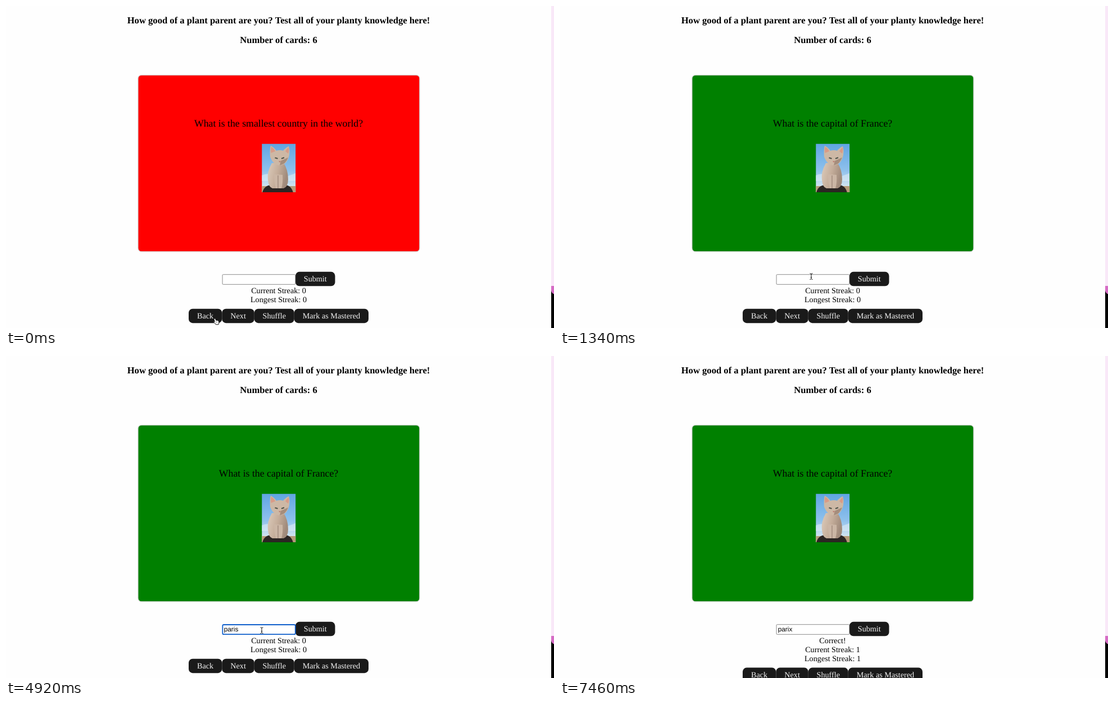
These frames come from a looping animation (975x574 px, 8 s). An HTML page:

```html
<!DOCTYPE html>
<html lang="en">
<head>
<meta charset="utf-8">
<title>Plant quiz cards</title>
<style>
  html, body { margin: 0; width: 100%; height: 100%; overflow: hidden; background: #fefefe; }
  svg { display: block; width: 975px; height: 574px; }
  text { font: 14.2px "Liberation Serif", "Times New Roman", serif; text-anchor: middle; text-rendering: geometricPrecision; white-space: pre; }
  .head { font-size: 16.61px; font-weight: bold; }
  .ask { font-size: 17.75px; }
  .typed { font: 11.83px "Liberation Sans", Arial, sans-serif; text-anchor: start; }
  .btn rect { fill: #1a1a1a; }
  .btn text { fill: #f4f4f4; }
</style>
</head>
<body>
<svg viewBox="0 0 975 574">
  <defs>
    <linearGradient id="sky" x2="0" y2="1">
      <stop offset="0" stop-color="#5fa5e2"/>
      <stop offset=".55" stop-color="#8fc1ec"/>
      <stop offset=".88" stop-color="#d3e5f1"/>
    </linearGradient>
    <linearGradient id="fur" x2="1" y2=".3">
      <stop offset="0" stop-color="#dccbbb"/>
      <stop offset=".55" stop-color="#c4ad9a"/>
      <stop offset="1" stop-color="#a08a7b"/>
    </linearGradient>
    <clipPath id="frame"><rect x="455.3" y="245.7" width="59.9" height="86.3"/></clipPath>
  </defs>

  <!-- window edge -->
  <rect x="970" width="5" height="499" fill="#f9e8f8"/>
  <rect x="970" y="499" width="5" height="75"/>
  <path d="M970 499h5v14.5q-4.300-1.500-5-6.500z" fill="#d66cc5"/>

  <text class="head" x="485" y="31">How good of a plant parent are you? Test all of your planty knowledge here!</text>
  <text class="head" x="485" y="66">Number of cards: 6</text>

  <rect id="card" x="235" y="123.200" width="500.800" height="314.600" rx="6" stroke="#ccc" stroke-width="1.100"/>
  <text id="ask" class="ask" x="485" y="215.300"></text>

  <!-- kitten picture -->
  <g clip-path="url(#frame)">
    <rect x="455" y="245" width="61" height="88" fill="url(#sky)"/>
    <path d="M455 302q12-6 20 2t40-6v14h-60z" fill="#dcebf5" opacity=".6"/>
    <path d="M455 321h61v12h-61z" fill="#b59a78"/>
    <path d="M456 333q3-14 18-14h24q10 2 13 14z" fill="#2b2523"/>
    <path d="M473 280q-9 16-7 30 1 13 8 15h20q8-3 8-16 0-17-8-29z" fill="url(#fur)"/>
    <path d="M477 300q0 15 3 25h10q3-10 2-24z" fill="#cbb6a5"/>
    <path d="M484 302v23" stroke="#8d776a"/>
    <path d="M470 269q-1-14 1-20 6 3 10 9 6-2 12 0 5-6 10-8 3 9 0 20-5 14-16 14t-17-15z" fill="#cdb8a5"/>
    <path d="M471.500 262q-1-7 .500-11 5 3 7 8zM497 259q3-5 6-7 1 6-1 11z" fill="#d99b87"/>
    <path d="M489 276l13-6q-4 12-15 14z" fill="#a58d7c"/>
    <path d="M478.500 270.500l5 1.500M490 272l5-1.700" stroke="#4c5147" stroke-width="2"/>
    <path d="M485 276.500h4l-2 2.500z" fill="#b8776b"/>
  </g>

  <g id="submit" class="btn"></g>
  <rect id="box" fill="#fff"/>
  <text id="typed" class="typed" x="387.700" y="491"></text>
  <path id="caret" stroke="#000" stroke-width=".900"/>

  <text id="note" x="485" y="512">Correct!</text>
  <g id="lower">
    <text id="now" x="485" y="512"></text>
    <text id="best" x="485" y="528"></text>
    <g id="row" class="btn"></g>
  </g>

  <g id="hand">
    <path d="M-2.700-5.300q1.200-.700 1.900.600l1.100 2.700 1.400-.300 1.200.500 1.200.100.900 1.400.400 3-.900 2.600H-.200l-1.300-2-2.400-2.400q-.300-1.400 1.200-1l.700.500-1.500-4.200q-.300-1 .800-1.500z"
          fill="#fff" stroke="#111" stroke-width="1" stroke-linejoin="round"/>
    <path d="M.300-.200v2M2-.100v2" stroke="#333" stroke-width=".600"/>
  </g>
  <path id="arrow" d="M0 0v11.500l2.700-2.500 1.900 4.200 1.900-.800-1.900-4.100h3.700z" stroke="#fff" stroke-width=".800"/>
  <path id="beam" d="M-2.500-5.200q2 0 2.500 1.200 .500-1.200 2.500-1.200M-2.500 5.500q2 0 2.500-1.200 .500 1.200 2.500 1.200M0-4v8.500M-1.200 1.800h2.400" fill="none" stroke="#111" stroke-width="1"/>
</svg>

<script>
const $ = id => document.getElementById(id);
const LOOP = 8000;

// Each track holds [start time, values...] and keeps its value until the next entry.
const cards = [
  [0, "#f00", "What is the smallest country in the world?"],
  [140, "#ffa500", "What is the largest mammal in the world?"],
  [290, "#008000", "What is the capital of France?"]
];
const typing = [
  [0, "", 0], [1640, "", 1], [2090, "o", 1], [2380, "oa", 1],
  [2680, "o", 1], [2830, "", 1], [2980, "p", 1], [3130, "pa", 1], [3270, "par", 1],
  [3870, "par", 0], [4020, "pari", 1], [4170, "paris", 1], [4620, "paris", 0],
  [5210, "paris", 1], [5660, "paris", 0], [5810, "pari", 1], [5960, "parix", 1],
  [6410, "parix", 0]
];
const pointer = [
  [0, "hand", 373.5, 562.5], [890, "hand", 392, 549], [1040, "arrow", 422, 512],
  [1190, "arrow", 440, 464], [1340, "beam", 447, 482], [1490, "beam", 449, 488],
  [1790, "beam", 449, 489], [4920, "beam", 455, 489], [5060, "beam", 461, 488],
  [5210, "beam", 464.3, 488], [6560, "beam", 496, 487], [6710, "hand", 554, 489.5],
  [7460, "none", 0, 0]
];
const FOCUS = [1640, 6860], CORRECT = 7010;

const at = (track, t) => track.findLast(step => step[0] <= t);
const set = (id, attrs) => {
  for (const key in attrs) $(id).setAttribute(key, attrs[key]);
};
const show = (id, on) => set(id, { visibility: on ? "visible" : "hidden" });

function button(parent, label, x, y, w) {
  $(parent).innerHTML +=
    `<rect x="${x}" y="${y}" width="${w}" height="25.5" rx="7.1"/>` +
    `<text x="${x + w / 2}" y="${y + 17.2}">${label}</text>`;
}

button("submit", "Submit", 515, 473.8, 70.5);
let left = 325;
for (const [label, w] of [["Back", 59.3], ["Next", 57.5], ["Shuffle", 71], ["Mark as Mastered", 132.2]]) {
  button("row", label, left, 539.7, w);
  left += w;
}

function draw(t) {
  const [, color, question] = at(cards, t);
  set("card", { fill: color });
  $("ask").textContent = question;

  const focused = t >= FOCUS[0] && t < FOCUS[1];
  set("box", focused
    ? { x: 385.4, y: 479, width: 129.4, height: 17.2, rx: 2, stroke: "#0f5fcb", "stroke-width": 1.8 }
    : { x: 385.1, y: 478.7, width: 129.7, height: 17.6, rx: 1.2, stroke: "#858585", "stroke-width": 0.95 });

  const [, value, caretOn] = at(typing, t);
  $("typed").textContent = value;
  const end = 388 + (value ? $("typed").getComputedTextLength() : 0);
  set("caret", { d: `M${end} 480.5V494` });
  show("caret", caretOn);

  const correct = t >= CORRECT;
  show("note", correct);
  set("lower", { transform: `translate(0 ${correct ? 15.9 : 0})` });
  $("now").textContent = "Current Streak: " + +correct;
  $("best").textContent = "Longest Streak: " + +correct;

  const [, kind, x, y] = at(pointer, t);
  for (const id of ["hand", "arrow", "beam"]) {
    show(id, id === kind);
    set(id, { transform: `translate(${x} ${y})` });
  }
}

const start = performance.now();
function tick() {
  draw((performance.now() - start) % LOOP);
  requestAnimationFrame(tick);
}
tick();
</script>
</body>
</html>
```
